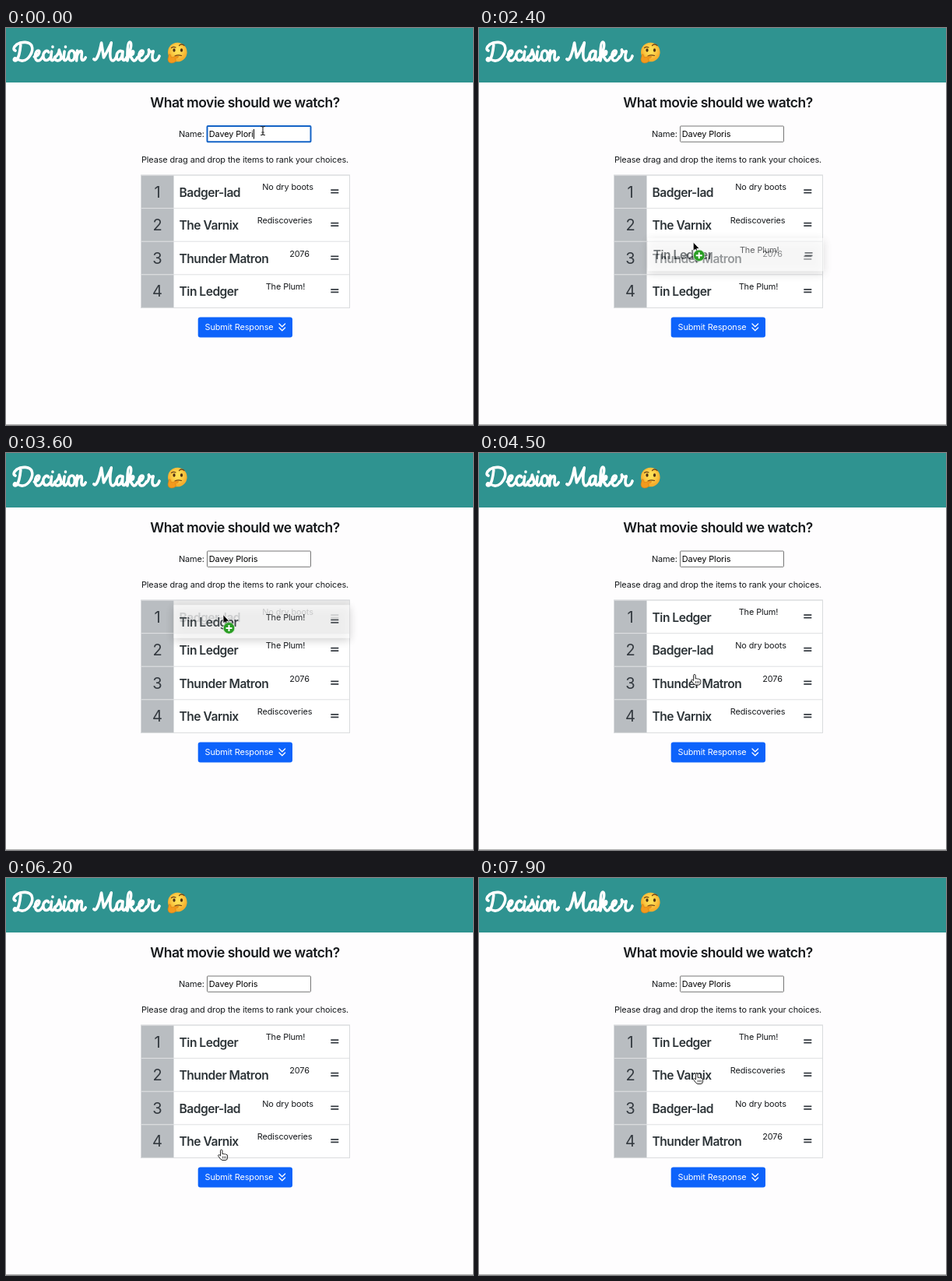
These frames come from a looping animation (600x510 px, 8 s). An HTML page:

```html
<!DOCTYPE html>
<html lang="en">
<head>
<meta charset="utf-8">
<title>Decision Maker</title>
<style>
  html, body { margin: 0; width: 100%; height: 100%; overflow: hidden; background: #fefdfe; }
  svg { display: block; font: 10.9px Inter, sans-serif; letter-spacing: -.1px; fill: #16191c; }
  .head { font-size: 17.5px; font-weight: 600; letter-spacing: -.5px; }
  .title { font-size: 15.6px; font-weight: 600; letter-spacing: -.5px; fill: #2d3438; }
  .num { font-size: 20px; fill: #343a40; }
  .mid { text-anchor: middle; }
  .line { fill: none; stroke-linecap: round; stroke-linejoin: round; }
  .ghost rect { fill-opacity: .75; filter: drop-shadow(0 3px 6px rgba(0, 0, 0, .28)); }
</style>
</head>
<body>
<svg width="600" height="510" viewBox="0 0 600 510">
  <defs>
    <radialGradient id="skin" cy=".4">
      <stop offset=".3" stop-color="#ffdf55"/><stop offset="1" stop-color="#f6ae2d"/>
    </radialGradient>
    <path id="e" d="M0 37C6 36 9 29 5 29C1 29-1 42 5 42C8 42 10 39 11 37"/>
    <path id="i" d="M2 30L1 38C1 43 4 43 7 37M3.4 24v.3"/>
  </defs>
  <rect width="600" height="70" fill="#2f9390"/>
  <g class="line" stroke="#fff" stroke-width="3.7" role="img" aria-label="Decision Maker">
    <g transform="translate(.4) scale(.97 1)">
      <path d="M19 22C18 31 17 37 14 41C11 43 9 41 11 39C14 38 17 43 22 42C30 41 36 30 34 24C32 17 20 17 14 21C9 25 9 28 12 29"/>
      <use href="#e" x="37"/>
      <path transform="translate(48)" d="M8 31C6 27 0 31 1 37C2 43 7 43 11 37"/>
      <use href="#i" x="58"/>
      <path transform="translate(64)" d="M0 38C4 35 6 31 6 28C7 33 10 36 8 40C6 43 1 42 1 40M8 40L12 37"/>
      <use href="#i" x="75"/>
      <path transform="translate(82)" d="M5 29C-1 29-1 42 4 42C10 42 10 29 5 29M8 32Q10 34 12 31"/>
      <path transform="translate(92)" d="M1 42L2 29M1 38C3 30 8 27 8 32L7.5 38C7.5 43 11 42 13 38"/>
    </g>
    <g transform="translate(4) scale(.98 1)">
      <path d="M111 40C114 44 118 34 121 19L124 38C128 32 131 25 134 19C132 28 131 42 136 42C138 42 139 40 140 38"/>
      <path transform="translate(140)" d="M9 31C5 27 0 32 1 38C2 44 8 41 9 30L8.5 38C9 43 12 42 14 38"/>
      <path transform="translate(154)" d="M0 38C5 32 8 18 4 18C1 18 1 34 1 42C2 34 9 27 9 31C9 35 4 35 3 35C6 35 7 42 10 42C12 42 13 40 14 38"/>
      <use href="#e" x="169"/>
      <path transform="translate(180)" d="M0 38C3 36 4 31 3 28C4 31 7 31 9 30C7 36 7 42 11 42C14 42 16 39 17 36"/>
    </g>
  </g>
  <g>
    <circle cx="220.3" cy="31" r="12.3" fill="url(#skin)"/>
    <g fill="#4f2f14"><ellipse cx="216" cy="28.5" rx="1.6" ry="2.2"/><ellipse cx="225.5" cy="28.5" rx="1.6" ry="2.2"/></g>
    <path class="line" stroke="#6b4218" stroke-width="1.2" d="M212.5 25.5Q215 23.5 218 25M222.5 22.5Q225.5 19.5 229 22.5M217 36Q221 34 225.5 35.5"/>
    <path fill="#f39a1e" stroke="#d97c12" stroke-width=".6" d="M209.5 34Q211 33 211.5 35L212.5 38L220 36Q222.5 36 221 38L217 39.5Q219.5 41 218 43Q215.5 45.5 212 45Q208 44.5 208 40Z"/>
  </g>
  <text class="head mid" x="307" y="102.3">What movie should we watch?</text>
  <text x="222" y="140">Name:</text>
  <rect id="field" x="258.5" y="126" width="133" height="20.3" rx="1" fill="#fff"/>
  <text id="name" x="260.8" y="140" style="fill:#000"></text>
  <path id="caret" stroke="#000" d="M318.5 130V142.5"/>
  <text class="mid" x="307" y="172.8">Please drag and drop the items to rank your choices.</text>
  <g id="list"></g>
  <rect x="246.7" y="371.5" width="121.3" height="26" rx="3" fill="#0d63fb"/>
  <text x="255.5" y="388.3" style="fill:#fff">Submit Response</text>
  <path class="line" stroke="#fff" stroke-width="1.3" d="M351 380l3.8 3.8l3.8-3.8m-7.6 5l3.8 3.8l3.8-3.8"/>
  <path stroke="#aeaeae" d="M0 509.5H600"/>
  <g id="top"></g>
</svg>
<script>
const LOOP = 8000, TOP = 189, PITCH = 42.6;
const $ = id => document.getElementById(id);
const clamp = v => Math.max(0, Math.min(1, v));

// title, note, centre of the note
const items = [
  ['Badger-lad', 'No dry boots', 362],
  ['The Varnix', 'Rediscoveries', 358],
  ['Thunder Matron', '2076', 377],
  ['Tin Ledger', 'The Plum!', 359]
];

// pick-up time, drop time, row taken, row swapped with, ghost opacity
const drags = [
  [1850, 2800, 3, 1, .68],
  [3100, 3750, 1, 0, .88],
  [4800, 5600, 2, 1, .88],
  [6450, 7500, 3, 1, 1]
];

// time, x, y of the pointer
const path = [
  [0, 330, 132], [900, 330, 132], [1700, 274, 322], [1850, 274, 322],
  [2800, 276, 246], [3100, 279, 244], [3750, 279, 202], [4650, 277, 291],
  [4800, 277, 291], [5600, 277, 260], [6200, 277, 349], [6450, 276, 339],
  [7500, 280, 243], [7900, 280, 251], [LOOP, 280, 251]
];

const shapes = {
  arrow: '<path fill="#000" stroke="#fff" stroke-width=".8" d="M0 0V11.5L2.7 9.2L4.3 13L6.1 12.2L4.5 8.6H8Z"/>',
  beam: '<path class="line" stroke="#222" stroke-width="1.1" d="M-2.5-5.5Q0-5.5 0-4V4Q0 5.5-2.5 5.5M2.5-5.5Q0-5.5 0-4M0 4Q0 5.5 2.5 5.5M-1.3 2H1.3"/>',
  hand: '<path fill="#fff" stroke="#222" d="M-1.5 8V1.2Q-1.5 0-.3 0T1 1.2V5.5Q2.2 4.7 3.3 5.8Q4.6 5 5.5 6.2Q7.5 5.8 7.6 8V10Q7.6 13.5 5 13.5H1Q-1 13.5-4 8.6Q-5 6.8-3.6 6.6Q-2.6 6.6-1.5 8Z"/><path stroke="#222" stroke-width=".8" d="M1.3 8.5v3M3.3 8.5v3M5.3 8.5v3"/>',
  badge: '<circle cx="7.5" cy="17.3" r="7.3" fill="#2a9d24" stroke="#d9ecd8" stroke-width=".7"/><path stroke="#fff" stroke-width="2" d="M3.5 17.3h8M7.5 13.3v8"/>'
};

function pointer(t) {
  const k = Math.max(1, path.findIndex(p => p[0] > t));
  const [t0, x0, y0] = path[k - 1], [t1, x1, y1] = path[k];
  const u = (t - t0) / (t1 - t0), s = u * u * (3 - 2 * u);
  return [x0 + (x1 - x0) * s, y0 + (y1 - y0) * s];
}

const rowTop = r => TOP + r * PITCH;

function content([title, note, cx], y) {
  return `<text class="title" x="222.5" y="${y + 27.5}">${title}</text>
    <text class="mid" x="${cx}" y="${y + 19.4}">${note}</text>
    <path stroke="#343a40" stroke-width="1.7" d="M417.3 ${y + 19.1}h10m-10 3.5h10"/>`;
}

function draw(t) {
  const order = [...items];
  let drag;
  for (const d of drags) {
    const [start, end, a, b] = d;
    if (t >= end) [order[a], order[b]] = [order[b], order[a]];
    else if (t >= start) drag = d;
  }
  const [x, y] = pointer(t);

  const focused = t < 400;
  $('field').setAttribute('stroke', focused ? '#1463c6' : '#767676');
  $('field').setAttribute('stroke-width', focused ? 2 : 1);
  $('name').textContent = t < 100 ? 'Davey Plori' : 'Davey Ploris';
  $('caret').setAttribute('visibility', t < 100 ? 'visible' : 'hidden');

  let list = '';
  order.forEach((item, r) => {
    const top = rowTop(r);
    // the row below a dragged item dims as the pointer enters it
    const depth = Math.min(y - top, top + PITCH - y);
    const over = drag && r !== drag[2] ? clamp((depth - 1) / 8) : 0;
    list += `<rect x="173.5" y="${top}" width="268" height="${PITCH}" fill="#fff"/>
      <rect x="215.5" y="${top}" width="226" height="${PITCH}" fill="#eaeaea" opacity="${over}"/>
      <rect x="173.5" y="${top}" width="42" height="${PITCH}" fill="#b9bdc1"/>
      <text class="num mid" x="194.5" y="${top + 28.6}">${r + 1}</text>
      <g opacity="${1 - over * .4}">${content(item, top)}</g>
      <path stroke="#dee0e2" d="M173.5 ${top}h268"/>`;
  });
  list += `<rect x="173.5" y="${TOP}" width="268" height="${PITCH * 4}" fill="none" stroke="#d9dbdd"/>`;
  $('list').innerHTML = list;

  let top = '', shape = 'arrow';
  if (drag) {
    const [gx, gy] = pointer(drag[0]), r = drag[2];
    top = `<g class="ghost" opacity="${drag[4]}" transform="translate(${x - gx} ${y - gy})">
      <rect x="215.5" y="${rowTop(r)}" width="226" height="${PITCH}" fill="#fff"/>
      ${content(order[r], rowTop(r))}</g>`;
  } else if (x > 258 && x < 392 && y > 125 && y < 147) shape = 'beam';
  else if (x > 215 && x < 441 && y > TOP && y < rowTop(4)) shape = 'hand';
  top += `<g transform="translate(${x} ${y})">${shapes[shape]}${drag ? shapes.badge : ''}</g>`;
  $('top').innerHTML = top;
}

function tick() {
  draw(performance.now() % LOOP);
  requestAnimationFrame(tick);
}
tick();
</script>
</body>
</html>
```
